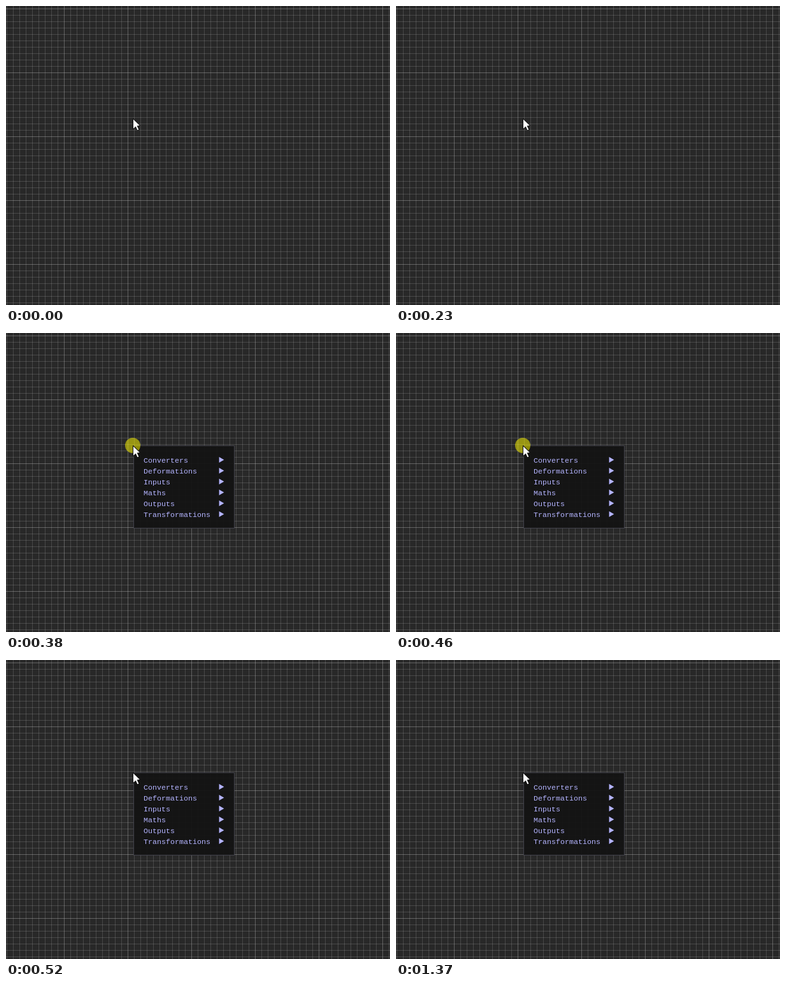
An HTML page with a canvas that plays this animation: 603x468 px, repeating every 1930 ms.

```html
<!DOCTYPE html>
<html lang="en">
<head>
<meta charset="utf-8">
<title>Node editor context menu</title>
<style>
  html, body { margin: 0; width: 603px; height: 468px; overflow: hidden; background: #282828; }
  canvas { display: block; }
</style>
</head>
<body>
<canvas id="stage" width="603" height="468"></canvas>
<script>
const canvas = document.getElementById('stage');
const ctx = canvas.getContext('2d');
const LOOP = 1930, PRESS = 380, RELEASE = 520;
const ITEMS = ['Converters', 'Deformations', 'Inputs', 'Maths', 'Outputs', 'Transformations'];
const INK = '#b4b4ff';

function polygon(points, color) {
  ctx.fillStyle = color;
  ctx.beginPath();
  points.forEach(([x, y]) => ctx.lineTo(x, y));
  ctx.closePath();
  ctx.fill();
}

function drawLines(step, color) {
  ctx.fillStyle = color;
  for (let x = 91 % step; x < canvas.width; x += step) ctx.fillRect(x, 0, 1, canvas.height);
  for (let y = 4; y < canvas.height; y += step) ctx.fillRect(0, y, canvas.width, 1);
}

function drawGrid() {
  ctx.fillStyle = '#282828';
  ctx.fillRect(0, 0, canvas.width, canvas.height);
  drawLines(10, 'rgba(200,200,200,.2)');
  drawLines(100, 'rgba(200,200,200,.2)');
}

function drawMenu() {
  ctx.fillStyle = 'rgba(20,20,20,.94)';
  ctx.fillRect(200, 176, 159, 130);
  ctx.strokeStyle = 'rgba(110,110,128,.5)';
  ctx.lineWidth = 1;
  ctx.strokeRect(200.5, 176.5, 158, 129);

  ctx.font = '11.665px "Liberation Mono", monospace';
  ctx.textBaseline = 'alphabetic';
  ITEMS.forEach((label, i) => {
    const y = 203 + i * 17;
    ctx.fillStyle = INK;
    ctx.fillText(label, 216, y);
    polygon([[334.6, y - 9], [342.4, y - 4.5], [334.6, y]], INK);
  });
}

function drawClick() {
  ctx.fillStyle = 'rgba(255,250,0,.52)';
  ctx.beginPath();
  ctx.arc(199, 176, 12, 0, Math.PI * 2);
  ctx.fill();
}

function drawCursor() {
  ctx.save();
  ctx.translate(199, 176);
  polygon([[0, 0], [1, 0], [12, 11], [12, 12], [8, 12], [10.5, 18], [9, 19],
    [7, 19], [4.5, 14], [1, 17], [0, 17]], '#111');
  polygon([[1, 1.6], [10.8, 11], [6.6, 11.4], [9.4, 17.6], [7.4, 18.3],
    [4.8, 12.5], [1, 15.8]], '#fff');
  ctx.restore();
}

function render() {
  const time = performance.now() % LOOP;
  drawGrid();
  if (time >= PRESS) drawMenu();
  if (time >= PRESS && time < RELEASE) drawClick();
  drawCursor();
  requestAnimationFrame(render);
}
render();
</script>
</body>
</html>
```
